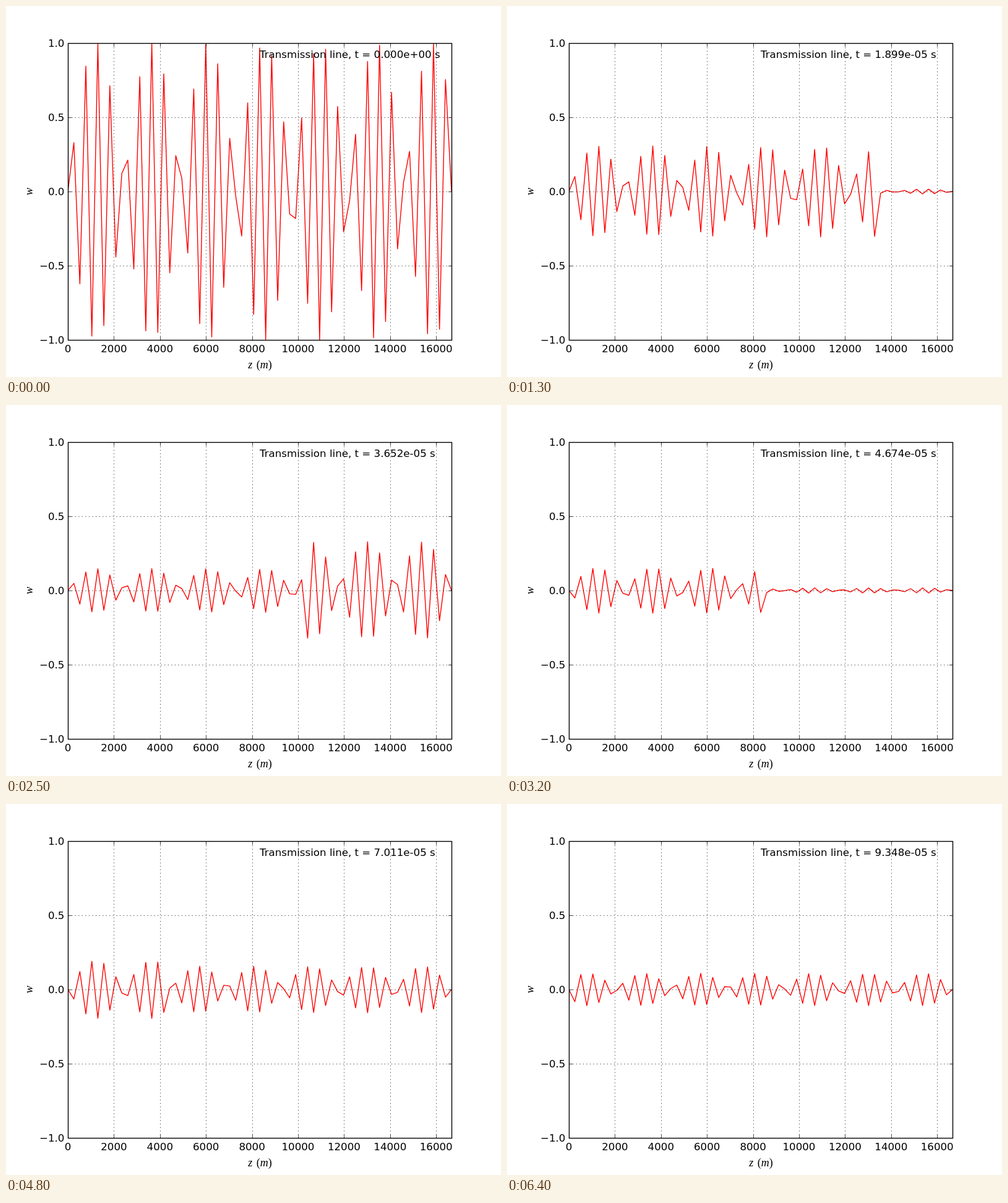
These frames come from a looping animation (800 px wide and 600 px high, 6.5 s). An HTML page:

```html
<!DOCTYPE html>
<html lang="en">
<head>
<meta charset="utf-8">
<title>Transmission line</title>
<style>
  html, body { margin: 0; width: 100%; height: 100%; overflow: hidden; background: #fff; }
  svg { display: block; width: 800px; height: 600px; }
  text { font: 16.667px "DejaVu Sans", sans-serif; fill: #000; }
  .math { font: italic 18px "Liberation Serif", serif; }
  .upright { font-style: normal; }
  #wave { fill: none; stroke: #f00; stroke-width: 1.389; stroke-linejoin: round; }
  .frame { fill: none; stroke: #000; stroke-width: 1.389; }
  .grid { stroke: #000; stroke-width: .694; stroke-dasharray: 1.389 4.167; }
  .tick { stroke: #000; stroke-width: .694; }
</style>
</head>
<body>
<svg viewBox="0 0 800 600">
  <clipPath id="area"><rect x="100" y="60" width="620" height="480"/></clipPath>
  <polyline id="wave" clip-path="url(#area)"/>
  <g id="axes"></g>
  <rect class="frame" x="100.5" y="60.5" width="620" height="480"/>
  <text id="label" x="410" y="84"></text>
  <text class="math" x="410.5" y="586" text-anchor="middle">z <tspan class="upright" dx="2">(</tspan>m<tspan class="upright">)</tspan></text>
  <text class="math" transform="translate(43 300) rotate(-90)" text-anchor="middle">w</text>
</svg>
<script>
const LEFT = 100, RIGHT = 720, TOP = 60, BOTTOM = 540, TICK = 5.556;
const LENGTH = 16667;            // metres
const CELLS = 64, STEPS = 65;
const STEP_MS = 100, DT = 1.46062e-6;
const PHASE = Math.PI - 0.3355;  // wave number times cell width
const DAMP = 0.034, LEAK = DAMP * DAMP;

const axes = document.getElementById('axes');
const wave = document.getElementById('wave');
const label = document.getElementById('label');

function add(tag, attrs, text = '') {
  const el = document.createElementNS('http://www.w3.org/2000/svg', tag);
  for (const key in attrs) el.setAttribute(key, attrs[key]);
  el.textContent = text;
  axes.append(el);
}
const line = (cls, x1, y1, x2, y2) => add('line', { class: cls, x1, y1, x2, y2 });
const snap = v => Math.round(v) + 0.5;
const toY = w => 300 - 240 * w;

function drawAxes() {
  for (let z = 0; z <= 16000; z += 2000) {
    const x = LEFT + (RIGHT - LEFT) * z / LENGTH, sx = snap(x);
    line('grid', sx, BOTTOM + 0.5, sx, TOP + 0.5);
    line('tick', sx, BOTTOM + 0.5, sx, BOTTOM + 0.5 - TICK);
    line('tick', sx, TOP + 0.5, sx, TOP + 0.5 + TICK);
    add('text', { x, y: 560, 'text-anchor': 'middle' }, z);
  }
  for (let w = -1; w <= 1; w += 0.5) {
    const y = toY(w), sy = snap(y);
    line('grid', LEFT + 0.5, sy, RIGHT + 0.5, sy);
    line('tick', LEFT + 0.5, sy, LEFT + 0.5 + TICK, sy);
    line('tick', RIGHT + 0.5, sy, RIGHT + 0.5 - TICK, sy);
    add('text', { x: 94.4, y: y + 6, 'text-anchor': 'end' }, w.toFixed(1).replace('-', '\u2212'));
  }
}

// Damped wave equation, one cell per time step, both ends held at zero.
function solve() {
  const inner = rule => Array.from({ length: CELLS + 1 }, (_, j) => j % CELLS ? rule(j) : 0);
  const start = Array.from({ length: CELLS + 1 }, (_, j) => Math.sin(j * PHASE));
  const states = [start, inner(j => (start[j - 1] + start[j + 1] - LEAK * start[j]) / 2)];
  while (states.length < STEPS) {
    const [old, now] = states.slice(-2);
    states.push(inner(j =>
      (now[j - 1] + now[j + 1] - LEAK * now[j] - (1 - DAMP) * old[j]) / (1 + DAMP)));
  }
  states[0] = inner(j => start[j]);
  return states;
}

const states = solve();
let shown = -1;

function show(step) {
  const dx = (RIGHT - LEFT) / CELLS;
  wave.setAttribute('points',
    states[step].map((w, j) => `${LEFT + j * dx},${toY(w).toFixed(3)}`).join(' '));
  const time = (step * DT).toExponential(3).replace(/([+-])(\d)$/, (_, sign, digit) => sign + '0' + digit);
  label.textContent = `Transmission line, t = ${time} s`;
  shown = step;
}

const begin = performance.now();
function tick() {
  const step = Math.floor(Math.max(0, performance.now() - begin) / STEP_MS) % STEPS;
  if (step !== shown) show(step);
  requestAnimationFrame(tick);
}

drawAxes();
show(0);
requestAnimationFrame(tick);
</script>
</body>
</html>
```
